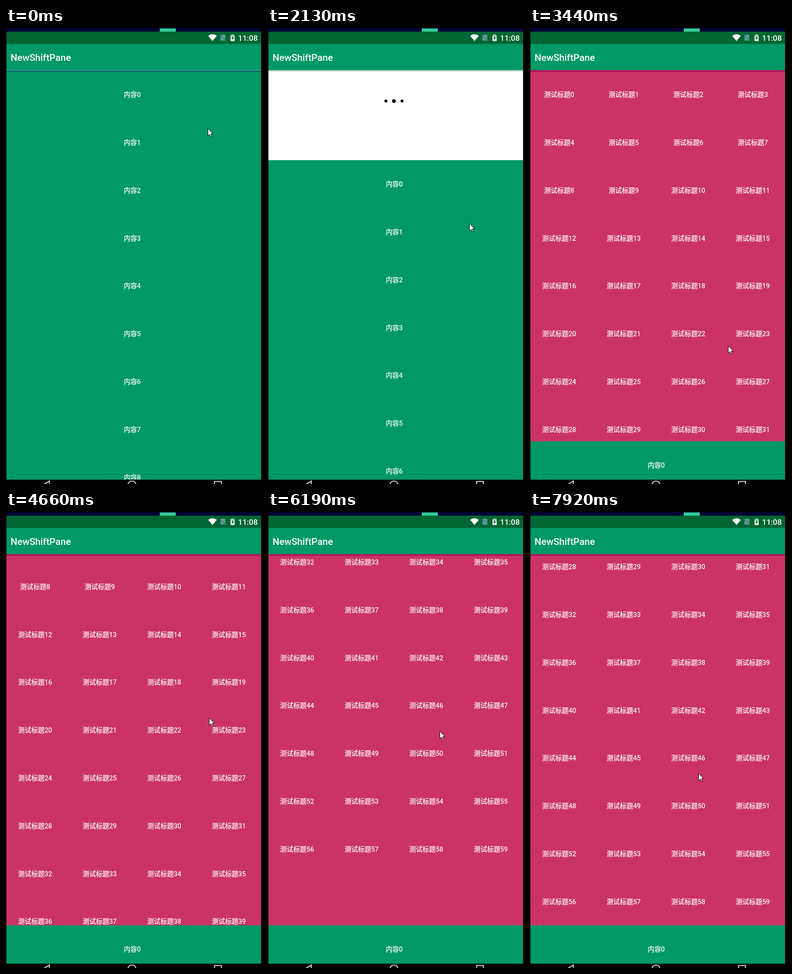
These frames come from a looping animation (561x999 px, 8000 ms). An HTML page:

```html
<!DOCTYPE html>
<html lang="zh-CN">
<head>
<meta charset="utf-8">
<title>NewShiftPane</title>
<style>
  html, body { margin: 0; width: 100%; height: 100%; overflow: hidden; background: #000; }
  svg { display: block; width: 100vw; height: 100vh; }
  text { font-family: Roboto, "Noto Sans CJK SC", "Noto Sans CJK", sans-serif; fill: #fff; }
  .item { font-size: 14.5px; text-anchor: middle; stroke: #fff; stroke-width: .25px; }
</style>
</head>
<body>
<svg viewBox="0 0 561 999">
  <rect width="561" height="999" fill="#000"/>
  <rect x="1" y="92" width="558" height="897" fill="#fff"/>
  <g id="dots">
    <circle r="3.2"/><circle r="4"/><circle r="3.2"/>
  </g>
  <g id="header">
    <rect x="1" y="92" width="558" height="897" fill="#cb3366"/>
    <g id="zoom"><g id="grid"></g></g>
  </g>
  <g id="sheet">
    <rect x="1" y="93.5" width="558" height="900" fill="#009966"/>
  </g>

  <rect x="1" width="558" height="8" fill="#000033"/>
  <rect x="337" y="1" width="35" height="7" fill="#33cc99"/>
  <rect x="1" y="8" width="558" height="26.5" fill="#006633"/>
  <rect x="1" y="34.5" width="558" height="58" fill="#009966"/>
  <rect id="shadow" x="1" y="92.5" width="558" fill-opacity=".7"/>
  <text x="10" y="72" font-size="20.8" font-weight="500">NewShiftPane</text>

  <path d="M443 17.2Q452.5 10.5 462 17.2L452.5 28.6Z" fill="#fff"/>
  <path d="M473.5 14.5H480.5V25L471 15.8ZM470 17L480 27.5H470Z" fill="#669999"/>
  <path d="M469 14.5L482 28" stroke="#669999" stroke-width="1.2"/>
  <path d="M492 15.5H494.5V14H498.5V15.5H501V28.5H492Z" fill="#fff"/>
  <path d="M492 15.5H494.5V14H498.5V15.5H501V19H492Z" fill="#99cc99"/>
  <path d="M497.5 17.5L493.5 23H496V26.5L500 21H497.5Z" fill="#006633"/>
  <text x="508.5" y="27.5" font-size="17" font-weight="500">11:08</text>

  <rect y="989.5" width="561" height="10" fill="#000"/>
  <g fill="none" stroke="#ccc" stroke-width="2.2">
    <path d="M95 1004V992.5L80 1001.5"/>
    <circle cx="276" cy="1001.5" r="9"/>
    <rect x="457" y="993.5" width="15" height="15"/>
  </g>
  <path id="cursor" d="M.5 .5V16.5L4 13L6.7 18.5H8.8L6.8 12H11.5Z" fill="#fff" stroke="#000"/>
</svg>
<script>
const LOOP = 8000, TOP = 93, MID = 276, ROW = 104.8;
const OPEN = 812, END = 759.6;
const RELEASE = 2210, SNAP = 90;
const HOLDS = [[5454, 6190], [6450, 7780]];

// pointer path: [time, x, y]
const PATH = [[60, 442, 220], [89, 435, 205], [600, 435, 205], [902, 436, 237],
  [2121.5, 441, 428], [RELEASE, 445, 516], [2608, 474, 608], [3000, 476, 644],
  [3421, 434, 696], [3830, 419, 568], [4150, 393, 291], [4450, 440, 700],
  [4641, 445, 450], [5373, 448, 435], [5454, 345, 739], [6186, 376, 480],
  [6450, 370, 739], [6999, 388, 434], [7079, 384, 523], [7740, 378, 525], [7892, 369, 572]];

const $ = id => document.getElementById(id);
const clamp = v => Math.max(0, Math.min(1, v));
const set = (el, attrs) => { for (const k in attrs) el.setAttribute(k, attrs[k]); };

function label(parent, str, x, y) {
  const el = document.createElementNS("http://www.w3.org/2000/svg", "text");
  set(el, { class: "item", x, y });
  el.textContent = str;
  parent.append(el);
}

for (let i = 0; i < 60; i++)
  label($("grid"), "测试标题" + i, MID + (i % 4 - 1.5) * 141.5, 151.2 + ROW * Math.floor(i / 4));
for (let i = 0; i < 9; i++)
  label($("sheet"), "内容" + i, MID + 0.5, 151.2 + ROW * i);

// the screen refreshes twice per beat, 80 ms apart
function tick(time) {
  const beat = 406.5, first = 89;
  if (time < first) return 0;
  const phase = (time - first) % beat;
  return time - phase + (phase < 80 ? 0 : 80);
}

function pointer(t) {
  const i = PATH.findIndex(p => p[0] > t);
  if (i === 0) return PATH[0].slice(1);
  if (i < 0) return PATH[PATH.length - 1].slice(1);
  const a = PATH[i - 1], b = PATH[i];
  const u = (t - a[0]) / (b[0] - a[0]);
  return [1, 2].map(c => a[c] + (b[c] - a[c]) * u);
}

// the sheet follows the finger, then glides open
function pullAt(t) {
  const drag = Math.max(0, pointer(Math.min(t, RELEASE))[1] - 232);
  return OPEN - (OPEN - drag) * (1 - clamp((t - RELEASE) / 740)) ** 3.5;
}

// a fling to the end of the list, then elastic drags past it
function scrollAt(t) {
  const u = clamp((t - 4450) / 580);
  let scroll = END * u * u * (3 - 2 * u);
  for (const [from, to] of HOLDS)
    if (t >= from) {
      const stretch = 0.4446 * (739 - pointer(Math.min(t, to))[1]);
      scroll += stretch * (1 - clamp((t - to) / SNAP)) ** 3;
    }
  return scroll;
}

function drawDots(pull) {
  const spread = clamp((pull - 65) / 70);
  const core = 5.5 * clamp(pull / 65) - 1.5 * spread;
  [...$("dots").children].forEach((dot, i) => set(dot, {
    cx: MID + (i - 1) * 17.7 * spread,
    cy: TOP + Math.min(pull / 2, 67),
    r: i === 1 ? core : spread > 0 ? 3.2 : 0
  }));
}

function drawShadow(pull, alpha) {
  const [fill, height] =
    pull < 3 ? ["#095566", 3.5] :
    alpha === 0 ? ["#9bc0a4", 2.5] :
    pull < OPEN - 1 ? ["#6e3349", 1] : ["#ac0058", 3.5];
  set($("shadow"), { fill, height });
}

function draw(time) {
  const t = tick(time);
  const [x, y] = pointer(t).map(Math.round);
  const pull = pullAt(t);
  const alpha = clamp((pull - 200) / 150);
  const zoom = 0.5 + 0.5 * pull / OPEN;
  drawDots(pull);
  drawShadow(pull, alpha);
  set($("header"), { opacity: alpha });
  set($("zoom"), { transform: `translate(${MID} ${TOP}) scale(${zoom}) translate(${-MID} ${-TOP})` });
  set($("grid"), { transform: `translate(0 ${-scrollAt(t)})` });
  set($("sheet"), { transform: `translate(0 ${Math.round(pull)})` });
  set($("cursor"), { transform: `translate(${x} ${y})` });
}

const start = performance.now();
function loop() {
  draw((performance.now() - start) % LOOP);
  requestAnimationFrame(loop);
}
loop();
</script>
</body>
</html>
```
